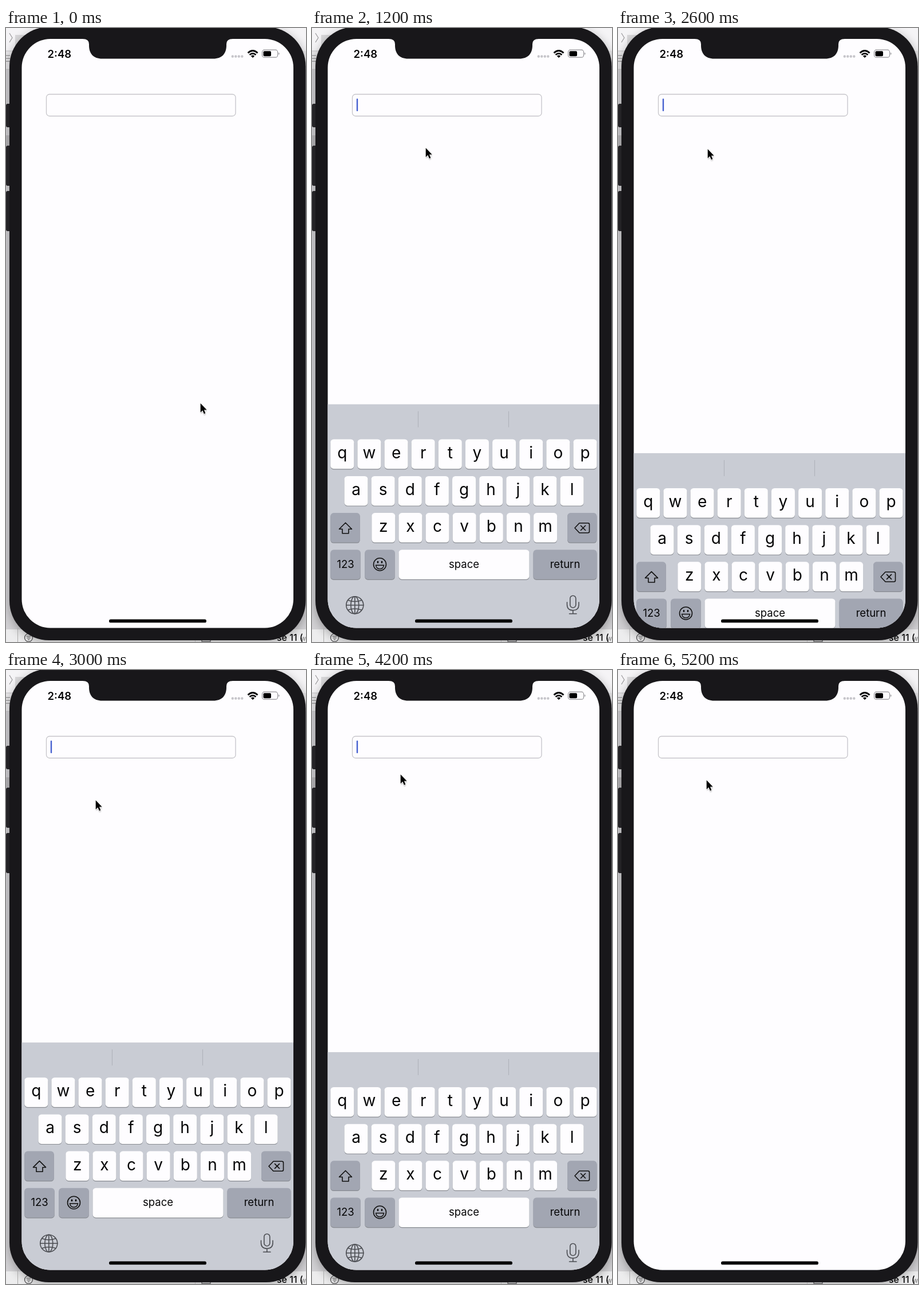
Recreate the animation shown at these times as an HTML page. Size 524 by 1070 pixels, loop 5300 ms.

```html
<!DOCTYPE html>
<html lang="en">
<head>
<meta charset="utf-8">
<title>Keyboard show and hide</title>
<style>
  html, body { margin: 0; width: 100%; height: 100%; overflow: hidden; background: #cfced1; }
  svg { display: block; width: 524px; height: 1070px; }
  text { font-family: Inter, Roboto, "Liberation Sans", sans-serif; fill: #050506; }
  .letter { font-size: 28px; text-anchor: middle; }
  .label { font-size: 18.5px; text-anchor: middle; }
  .icon { fill: none; stroke: #111; stroke-width: 1.6; stroke-linejoin: round; stroke-linecap: round; }
  .soft { stroke: #4b4d52; }
</style>
</head>
<body>
<svg viewBox="0 0 524 1070">
  <defs>
    <clipPath id="screenClip"><rect x="27.5" y="19" width="474.5" height="1026.5" rx="50"/></clipPath>
    <filter id="blur" x="-20%" y="-20%" width="140%" height="140%"><feGaussianBlur stdDeviation="9"/></filter>
    <filter id="cursorBlur" x="-50%" y="-50%" width="200%" height="200%"><feGaussianBlur stdDeviation="1"/></filter>
    <path id="arrow" d="M0 0V16L3.7 12.6L6.2 18.4L8.7 17.3L6.2 11.6H11Z"/>
  </defs>

  <!-- window behind the phone -->
  <rect width="524" height="1070" fill="#d2d1d4"/>
  <rect width="524" height="40" fill="#f5f4f6"/>
  <rect y="40" width="524" height="32" fill="#e9e8ea"/>
  <rect x="16" y="12" width="40" height="28" fill="#d9d8da"/>
  <path d="M0 40H30M0 72H30" stroke="#c3c2c4"/>
  <path d="M0 48H7M0 53H7M0 58H7" stroke="#777" stroke-width="1.2"/>
  <path d="M6 9L11 17L6 25" fill="none" stroke="#9a999b" stroke-width="1.2"/>
  <rect y="187" width="8" height="18" fill="#b9b8ba"/>
  <rect y="1048" width="524" height="22" fill="#ededee"/>
  <rect x="6" y="4" width="518" height="1066" rx="68" fill="#000" opacity=".3" filter="url(#blur)"/>
  <path d="M20.5 1046V1070M330.5 1060V1070" stroke="#aaa"/>
  <g fill="none" stroke="#454547" stroke-width="1.2">
    <circle cx="39.5" cy="1062.5" r="7"/>
    <path d="M35.5 1060H43.5M36.5 1063H42.5M38 1066H41"/>
    <rect x="342" y="1056" width="15" height="13"/>
  </g>
  <text x="473" y="1067.5" font-size="16" font-weight="500">se 11 (</text>
  <text x="515" y="1067.5" font-size="11" style="fill:#777">w</text>

  <!-- phone -->
  <g fill="#242326">
    <rect y="132" width="12" height="41" rx="3"/>
    <rect y="205" width="12" height="70" rx="3"/>
    <rect y="284" width="12" height="70" rx="3"/>
  </g>
  <rect x="6" y="-2" width="517.5" height="1069" rx="69" fill="#18171a"/>
  <g clip-path="url(#screenClip)">
    <rect x="27" y="19" width="476" height="1027" fill="#fefdff"/>
    <rect x="70.5" y="115.5" width="330.5" height="38" rx="5.5" fill="#fefdff" stroke="#c5c4c9" stroke-width="1.3"/>
    <rect id="caret" x="77.8" y="123" width="2.4" height="22" rx="1" fill="#4560cf"/>
    <g id="keyboard">
      <rect x="27" width="476" height="440" fill="#c9ccd4"/>
      <path d="M185.5 12V40M343.5 12V40" stroke="#b0b3bb" stroke-width="1.2"/>
      <g id="keys"></g>
      <path class="icon" d="M58.5 206.5L69.5 217.5H64V225H53V217.5H47.5Z"/>
      <path class="icon" d="M467 207H482Q484.5 207 484.5 209.5V221.500Q484.500 224 482 224H467L459 215.500ZM469.500 211.500L477.500 219.500M477.500 211.500L469.500 219.500"/>
      <circle class="icon" cx="118.500" cy="279" r="11"/>
      <path d="M111.500 280.500H125.500Q124.500 287 118.500 287T111.500 280.500Z" fill="none" stroke="#111" stroke-width="1.400"/>
      <ellipse cx="115" cy="275" rx="1.300" ry="2"/>
      <ellipse cx="122" cy="275" rx="1.300" ry="2"/>
      <g class="icon soft">
        <circle cx="74.800" cy="350" r="15"/>
        <ellipse cx="74.800" cy="350" rx="7" ry="15"/>
        <path d="M74.800 335V365M60 350H90M63 341.500Q74.800 346 86.600 341.500M63 358.500Q74.800 354 86.600 358.500"/>
        <rect x="450.800" y="333.500" width="10" height="21" rx="5"/>
        <path d="M445.500 345V349Q445.500 359 455.800 359T466 349V345M455.800 359V365M449.500 365H462"/>
      </g>
    </g>
  </g>
  <path d="M134 17V19Q145 19 145 28V30C145 45 153 53.500 168 53.500H362C377 53.500 385 45 385 30V28Q385 19 396 19V17Z" fill="#18171a"/>

  <!-- status bar -->
  <text x="72.500" y="51.500" font-size="18.500" font-weight="600">2:48</text>
  <g fill="#c6c5ca">
    <circle cx="395.800" cy="49.500" r="2.200"/><circle cx="401.300" cy="49.500" r="2.200"/>
    <circle cx="406.800" cy="49.500" r="2.200"/><circle cx="412.300" cy="49.500" r="2.200"/>
  </g>
  <g fill="none" stroke="#050506" stroke-width="2.700">
    <path d="M422.500 43.500Q431 35.500 439.500 43.500"/>
    <path d="M425.500 46.800Q431 41.800 436.500 46.800"/>
  </g>
  <path d="M431 52L427.800 48.800Q431 46.200 434.200 48.800Z"/>
  <rect x="447.500" y="38.200" width="27" height="13" rx="3.800" fill="none" stroke="#929195" stroke-width="1.200"/>
  <rect x="449.500" y="40.200" width="13.500" height="9" rx="2"/>
  <path d="M476 42.500Q479 44.700 476 47Z" fill="#929195"/>
  <rect x="180" y="1030.500" width="170" height="5.800" rx="2.900" fill="#000"/>

  <g id="cursor">
    <use href="#arrow" x="1" y="4" opacity=".4" filter="url(#cursorBlur)"/>
    <use href="#arrow" x=".7" y="2" stroke="#fff" stroke-width="1.800"/>
    <use href="#arrow" x=".7" y="2"/>
  </g>
</svg>
<script>
  const LOOP = 5300, STEP = 100;
  const KB_TOP = 649, KB_HEIGHT = 396, OMEGA = 18.26;
  const $ = id => document.getElementById(id);

  // Keys
  let keyMarkup = "";
  function addKey(x, y, width, text = "", kind = "letter", fill = "#fefdff") {
    const box = (dy, color) =>
      `<rect x="${x}" y="${y + dy}" width="${width}" height="51.5" rx="5.5" fill="${color}"/>`;
    const baseline = y + (kind === "letter" ? 33 : 31.5);
    keyMarkup += box(1.2, "#898c92") + box(0, fill) +
      `<text class="${kind}" x="${x + width / 2}" y="${baseline}">${text}</text>`;
  }
  [["qwertyuiop", 32.3, 61], ["asdfghjkl", 56.5, 125.2], ["zxcvbnm", 104.3, 189.4]]
    .forEach(([letters, x, y]) =>
      [...letters].forEach((c, i) => addKey(x + i * 47.13, y, 41, c)));
  const GREY = "#a2a6b2";
  addKey(32.3, 189.4, 51.5, "", "label", GREY);
  addKey(446, 189.4, 51.5, "", "label", GREY);
  addKey(32.3, 253.5, 52.5, "123", "label", GREY);
  addKey(92.3, 253.5, 52.5, "", "label", GREY);
  addKey(151.5, 253.5, 228, "space", "label");
  addKey(386.5, 253.5, 111, "return", "label", GREY);
  $("keys").innerHTML = keyMarkup;

  // Keyboard sessions: slide in, slide out, caret on, caret off
  const sessions = [[870, 1525, 900, 1500], [2447, 3040, 2500, 3100], [3930, 4540, 4000, 4600]];

  // Pointer path: time, x, y
  const pointer = [
    [0, 339, 652], [100, 300, 440], [200, 263, 225], [300, 263, 225],
    [500, 232, 190], [600, 211, 160], [700, 201, 146], [800, 201, 146],
    [1000, 200, 172], [1200, 198, 207], [1500, 198, 256], [2000, 198, 256],
    [2200, 165, 170], [2300, 157, 142], [2400, 157, 142], [2600, 156, 209],
    [2800, 156, 225], [3100, 156, 225], [3400, 157, 160], [3500, 157, 147],
    [3600, 157, 139], [3700, 153, 135], [3900, 153, 135], [4200, 154, 180],
    [4400, 154, 190], [LOOP, 154, 190]
  ];

  function pointerAt(t) {
    const i = pointer.findIndex(p => p[0] > t);
    const [t0, x0, y0] = pointer[i - 1], [t1, x1, y1] = pointer[i];
    const k = (t - t0) / (t1 - t0);
    return [x0 + (x1 - x0) * k, y0 + (y1 - y0) * k];
  }

  // Critically damped spring, 1 falling to 0
  function spring(ms) {
    const a = OMEGA * ms / 1000;
    return (1 + a) * Math.exp(-a);
  }

  function hiddenPart(t) {
    const s = sessions.filter(([show]) => t >= show).pop();
    if (!s) return 1;
    return t < s[1] ? spring(t - s[0]) : 1 - spring(t - s[1]);
  }

  const start = performance.now();
  function draw() {
    const elapsed = (performance.now() - start) % LOOP;
    const t = Math.floor(elapsed / STEP) * STEP;
    const top = KB_TOP + KB_HEIGHT * hiddenPart(t) + (hiddenPart(t) === 1 ? 2 : 0);
    $("keyboard").setAttribute("transform", `translate(0 ${top.toFixed(2)})`);
    $("caret").setAttribute("opacity", sessions.some(s => t >= s[2] && t < s[3]) ? 1 : 0);
    $("cursor").setAttribute("transform", `translate(${pointerAt(t)})`);
    requestAnimationFrame(draw);
  }
  draw();
</script>
</body>
</html>
```
